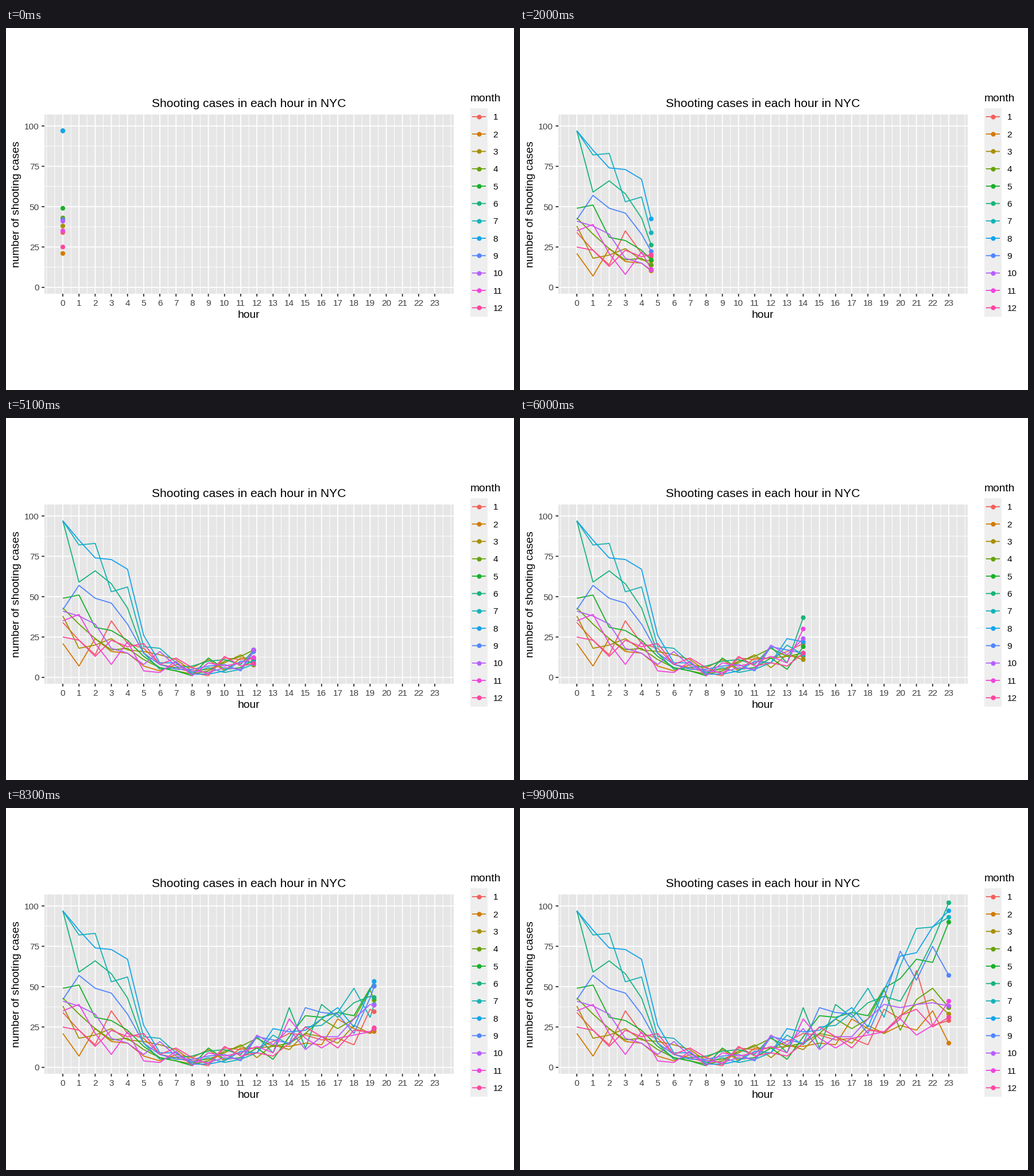
These frames come from a looping animation (885 px wide and 632 px high, 10000 ms). A matplotlib script:

```python
import numpy as np
import matplotlib.pyplot as plt
from matplotlib.animation import FuncAnimation
from matplotlib.patches import Rectangle

W, H, DPI = 885, 632, 64
FRAMES, INTERVAL = 100, 100
PX = 72 / DPI  # points per pixel

LINE, DOT = 1.8, 8.2
INK, TICK, LABEL = "black", "#2b2b2b", "#404040"
PANEL, KEY = "#e6e6e6", "#eeeeee"
COLORS = ["#f35e5a", "#d37a02", "#a79001", "#65a202", "#18b12a", "#18b479",
          "#17b3b7", "#14a4ec", "#5086ff", "#b65fff", "#f145de", "#ff459f"]

# One row per month.
NIGHT = np.array([  # hours 0 to 6
    [34, 23, 14, 35, 21, 18, 8],
    [21, 7, 24, 16, 15, 7, 4],
    [38, 18, 20, 24, 17, 16, 14],
    [43, 33, 24, 17, 18, 11, 6],
    [49, 51, 31, 29, 23, 13, 6],
    [97, 59, 66, 58, 43, 15, 5],
    [97, 82, 83, 53, 56, 19, 18],
    [97, 85, 74, 73, 67, 26, 9],
    [42, 57, 49, 46, 33, 15, 8],
    [41, 38, 33, 18, 15, 8, 16],
    [35, 39, 21, 8, 22, 4, 3],
    [25, 23, 13, 23, 19, 21, 8],
])
EVENING = np.array([  # hours 12 to 23
    [12, 16, 21, 20, 17, 18, 14, 36, 30, 60, 26, 29],
    [12, 13, 13, 15, 14, 30, 24, 21, 26, 23, 35, 15],
    [6, 14, 11, 21, 19, 15, 26, 21, 32, 39, 42, 33],
    [18, 13, 15, 21, 30, 24, 30, 48, 23, 42, 49, 37],
    [12, 5, 19, 32, 31, 34, 32, 49, 55, 67, 65, 90],
    [19, 9, 37, 12, 39, 31, 40, 44, 41, 58, 78, 102],
    [9, 20, 14, 25, 26, 34, 49, 31, 63, 86, 87, 93],
    [9, 24, 22, 23, 30, 37, 25, 48, 69, 71, 87, 97],
    [19, 17, 15, 37, 34, 33, 21, 43, 72, 54, 75, 57],
    [20, 14, 24, 11, 19, 19, 30, 39, 37, 39, 40, 38],
    [13, 9, 30, 18, 12, 18, 20, 22, 30, 20, 26, 41],
    [9, 7, 15, 25, 19, 12, 23, 22, 32, 36, 25, 31],
])


def morning():
    """Quiet hours 7 to 11: months shuffled inside a narrow band."""
    rng = np.random.default_rng(7)
    low, high = [4, 1, 1, 3, 4], [12, 7, 12, 13, 14]
    spread = np.linspace(0, 1, 12) ** 1.2
    return np.column_stack([np.round(a + (b - a) * rng.permutation(spread))
                            for a, b in zip(low, high)])


CASES = np.hstack([NIGHT, morning(), EVENING])
HOURS = np.arange(24)
# Every hour is reached on a whole frame.
ARRIVAL = np.round(HOURS * (FRAMES - 1) / 23)


def px(hour):
    return 99 + 28.174 * np.asarray(hour)


def py(count):
    return 452.8 - 2.818 * np.asarray(count)


fig = plt.figure(figsize=(W / DPI, H / DPI), dpi=DPI, facecolor="white")
ax = fig.add_axes([0, 0, 1, 1])
ax.set(xlim=(0, W), ylim=(H, 0))
ax.axis("off")


def box(x0, y0, x1, y1, color):
    ax.add_patch(Rectangle((x0, y0), x1 - x0, y1 - y0, fc=color, lw=0, zorder=0))


def stroke(xs, ys, color, width=LINE, z=1):
    return ax.plot(xs, ys, color=color, lw=width * PX, zorder=z, snap=False,
                   solid_capstyle="butt", solid_joinstyle="round")[0]


def dots(xs, ys, colors, z):
    return ax.scatter(xs, ys, s=(DOT * PX) ** 2, c=colors, lw=0, zorder=z)


def text(x, y, s, size, color=INK, ha="center", rotation=0):
    ax.text(x, y, s, fontsize=size * PX, color=color, ha=ha, va="baseline",
            family="Liberation Sans", rotation=rotation, rotation_mode="anchor")


def draw_panel():
    left, top, right, bottom = 67, 151.3, 780, 464
    box(left, top, right, bottom, PANEL)
    for y in py(np.arange(12.5, 100, 25)):
        stroke([left, right], [y, y], "white", 0.93)
    for x in px(np.append(np.arange(-0.5, 24), [-1, 24])):
        stroke([x, x], [top, bottom], "white", 0.93)
    for count in range(0, 101, 25):
        y = py(count)
        stroke([left, right], [y, y], "white", z=2)
        stroke([left - 4.8, left], [y, y], TICK)
        text(58, y + 5.7, str(count), 15.4, LABEL, "right")
    for hour in HOURS:
        x = px(hour)
        stroke([x, x], [top, bottom], "white", z=2)
        stroke([x, x], [bottom, bottom + 4.8], TICK)
        text(x, 485, str(hour), 15.4, LABEL)
    text(423, 138, "Shooting cases in each hour in NYC", 21)
    text(423, 506, "hour", 19.2)
    text(23.5, 308, "number of shooting cases", 19.2, rotation=90)


def draw_legend():
    text(808.5, 128.5, "month", 19.2, ha="left")
    box(808.7, 139.6, 839, 503.6, KEY)
    for i, color in enumerate(COLORS):
        y = 154.8 + 30.33 * i
        stroke([811.7, 836], [y, y], color)
        dots([823.8], [y], [color], 2)
        text(848.5, y + 5.7, str(i + 1), 15.4, ha="left")


draw_panel()
draw_legend()
trails = [stroke([], [], color, z=3) for color in COLORS]
heads = dots(np.zeros(12), np.zeros(12), COLORS, 4)


def update(frame):
    now = np.interp(frame, ARRIVAL, HOURS)
    seen = HOURS < now
    xs = px(np.append(HOURS[seen], now))
    tips = np.array([np.interp(now, HOURS, row) for row in CASES])
    for trail, row, tip in zip(trails, CASES, tips):
        trail.set_data(xs, py(np.append(row[seen], tip)))
    heads.set_offsets(np.column_stack([np.full(12, px(now)), py(tips)]))
    return [*trails, heads]


anim = FuncAnimation(fig, update, frames=FRAMES, interval=INTERVAL,
                     repeat=True, repeat_delay=0, blit=False)
plt.show()
```
